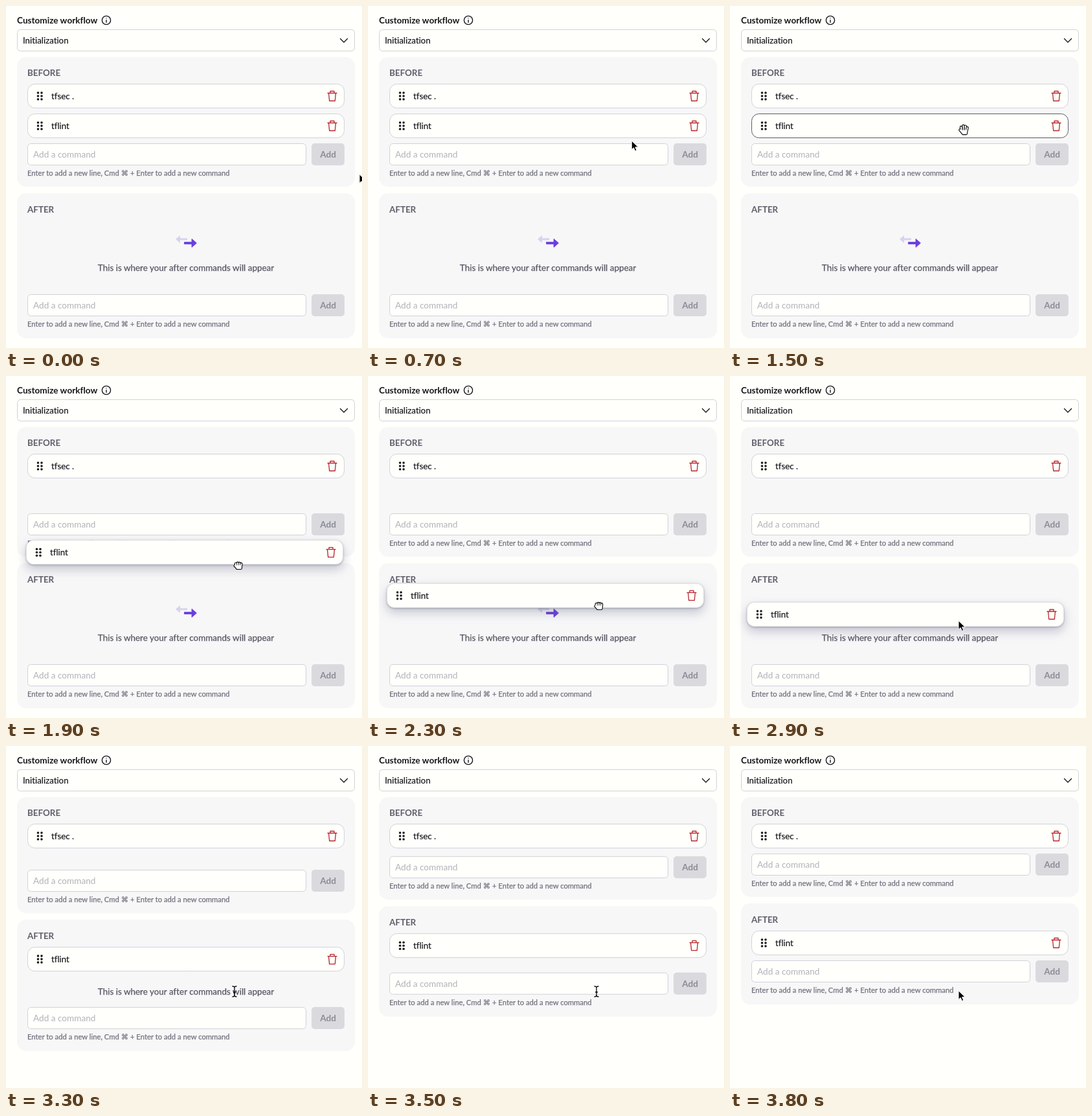
An HTML page that plays this animation: 550x528 px, repeating every 3900 ms.

```html
<!DOCTYPE html>
<html lang="en">
<head>
<meta charset="utf-8">
<title>Customize workflow</title>
<style>
  html, body { margin: 0; width: 100%; height: 100%; overflow: hidden; background: #fffffc; }
  svg { display: block; }
  text { font: 13.6px Lato, "Open Sans", sans-serif; font-variant-ligatures: none; fill: #17171c; }
  .bold { font-weight: 700; }
  .head { font-weight: 700; font-size: 13.4px; fill: #5f5f6a; }
  .item { font-size: 13.3px; stroke: #17171c; stroke-width: .2; }
  .hint { font-size: 11.28px; fill: #71717e; stroke: #71717e; stroke-width: .25; }
  .ghost { fill: #b2b2ba; }
  .note { font-size: 13.47px; fill: #565661; stroke: #565661; stroke-width: .25; text-anchor: middle; }
  .add { font-weight: 700; fill: #8b8b97; text-anchor: middle; }
  .panel { fill: #f7f7f8; }
  .box { fill: #fffffc; stroke: #d2d2d8; }
  .line { fill: none; stroke: #17171c; stroke-width: 1.4; stroke-linecap: round; stroke-linejoin: round; }
  .trash { fill: none; stroke: #b8242c; stroke-width: 1.3; stroke-linecap: round; stroke-linejoin: round; }
  .hover .box { stroke: #5c5c66; }
  .lifted { filter: drop-shadow(0 1px 1.5px rgba(60, 60, 75, .35)) drop-shadow(0 7px 8px rgba(80, 85, 115, .3)); }
  .lifted .box { stroke: #e2e2e6; }
  .cursor path { stroke-linecap: round; stroke-linejoin: round; }
</style>
</head>
<body>
<svg id="stage" width="550" height="528" viewBox="0 0 550 528"></svg>
<script>
const LOOP = 3900, STEP = 100;
const GRAB = 1500, RELEASE = 2700, DROP = 2900, SETTLED = 3100;

const text = (x, y, cls, s) => `<text x="${x}" y="${y}" class="${cls}">${s}</text>`;
const rect = (x, y, w, h, r, cls, id = '') =>
  `<rect id="${id}" x="${x}" y="${y}" width="${w}" height="${h}" rx="${r}" class="${cls}"/>`;

const dots = [14, 19, 24].map(y =>
  [16.5, 22].map(x => `<circle cx="${x}" cy="${y}" r="1.8" fill="#17171c"/>`).join('')).join('');

const card = (id, label, x, y) => `<g id="${id}" transform="translate(${x} ${y})">
  ${rect(.5, .5, 489, 37, 11, 'box')}${dots}${text(37, 24, 'item', label)}
  <path class="trash" d="M464 14.5H478M468 14V11.5H474V14M465.5 14.5L466.7 26.5H475.3L476.5 14.5"/>
</g>`;

const form = (id, y) => `<g id="${id}"><g transform="translate(33 ${y})">
  ${rect(.5, .5, 430, 33, 5, 'box')}${text(9, 22, 'ghost', 'Add a command')}
  <rect x="439" width="51" height="34" rx="5" fill="#dadade"/>${text(464.5, 22, 'add', 'Add')}
  ${text(0, 50, 'hint', 'Enter to add a new line, Cmd ⌘ + Enter to add a new command')}
</g></g>`;

// A hand is stroked twice: a thick black outline, then a thinner white body.
const hand = (id, d, creases) => `<g id="${id}">
  <path d="${d}" fill="#000" stroke="#000" stroke-width="4.4"/>
  <path d="${d}" fill="#fff" stroke="#fff" stroke-width="2.2"/>
  <path d="${creases}" stroke="#000" stroke-width=".8"/></g>`;

const cursors = `<g id="pointer" class="cursor">
  <path id="arrow" d="M0 0V13.5L3.2 10.6L5.4 15.6L7.8 14.6L5.6 9.7H10Z" fill="#000" stroke="#fff"/>
  <path id="beam" d="M-3 -7Q0 -7 0 -5V7Q0 9 -3 9M3 -7Q0 -7 0 -5M0 7Q0 9 3 9M-1.5 2H1.5"
    fill="none" stroke="#000" stroke-width="1.3"/>
  ${hand('open', 'M-3 2L-4 -4M-.5 1V-6M2.3 1L2.8 -5.4M4.6 1L5.6 -3M-2.5 4L-5.6 .4M-3 2L4.6 1L3.8 6H-1Z',
    'M-1.8 -3V0M1.2 -3.6V0M4 -2.6L3.7 0')}
  ${hand('grab', 'M-3.6 -1V-2.6M-.8 -1V-3.4M2 -1V-3.2M4.6 -1V-2.2M-5 1L-3.6 0M-3.6 -1L4.6 -1L4 4.6H-1.6L-4.4 1Z',
    'M-2.2 -3V-.4M.6 -3.4V-.4M3.3 -3V-.4')}
</g>`;

stage.innerHTML = `
  ${text(17, 27, 'bold', 'Customize workflow')}
  <circle cx="155" cy="22" r="6.6" class="line"/>
  <path class="line" d="M155 21.6V25.2M155 18.7V18.8"/>
  ${rect(17.5, 36.5, 521, 33, 5, 'box')}
  ${text(26, 58, 'item', 'Initialization')}
  <path class="line" d="M516.5 50.5L522 56L527.5 50.5"/>
  ${rect(17, 79, 522, 200, 14, 'panel', 'panel1')}
  ${text(33, 108, 'head', 'BEFORE')}
  ${card('first', 'tfsec .', 33, 120)}
  ${form('form1', 212)}
  <g id="after">
    ${rect(17, 289, 522, 224, 14, 'panel', 'panel2')}
    ${text(33, 319, 'head', 'AFTER')}
    <g id="empty">
      <path d="M262 360L269 354V358.5H280V361.5H269V366Z" fill="#d8d2ee"/>
      <path d="M294.5 366L287 359.5V364.5H275.5V367.5H287V372.5Z" fill="#6b3fdc"
        stroke="#6b3fdc" stroke-width=".8" stroke-linejoin="round"/>
      ${text(278, 409, 'note', 'This is where your after commands will appear')}
    </g>
    ${form('form2', 445)}
  </g>
  ${card('moving', 'tflint', 33, 166)}
  ${cursors}`;

const $ = id => document.getElementById(id);
const move = (id, x, y) => $(id).setAttribute('transform', `translate(${x} ${y})`);
const ramp = (t, from, to) => Math.min(1, Math.max(0, (t - from) / (to - from)));
const easeOut = p => p * (2 - p);
const mix = (a, b, p) => a + (b - a) * p;

function pointerAt(t) {
  const arrive = easeOut(ramp(t, 0, 1400));
  const drag = easeOut(ramp(t, GRAB, 2740));
  return [
    mix(546, 361, arrive) - 8 * ramp(t, GRAB, DROP),
    mix(260, 191, arrive) + 187 * drag
  ];
}

// The card trails the hand, then slides into its slot.
function cardAt(t) {
  const settle = ramp(t, DROP, SETTLED);
  const drag = easeOut(ramp(t, 1560, 2790));
  return [
    mix(mix(33, 26, ramp(t, GRAB, DROP)), 33, settle),
    mix(mix(166, 349, drag), 331, settle)
  ];
}

function draw(t) {
  const up = -46 * ramp(t, SETTLED, 3540);
  const low = -68 * ramp(t, 3170, 3590);
  const noteShift = low * .19;
  $('panel1').setAttribute('height', 200 + up);
  $('panel2').setAttribute('height', 224 + low);
  move('form1', 0, up);
  move('after', 0, up);
  move('form2', 0, low);
  move('empty', 0, noteShift);
  $('empty').setAttribute('opacity', 1 - ramp(t, 3300, 3500));

  const [cx, cy] = cardAt(t);
  move('moving', cx, cy + up);

  const [px, py] = pointerAt(t);
  const overInput = top => px < 464 && py > top && py < top + 34;
  const overText = overInput(212 + up) || overInput(445 + up + low)
    || Math.abs(404 + up + noteShift - py) < 8;
  const dragging = t > GRAB && t < RELEASE;
  const hovering = t <= GRAB && py < 204;
  const shape = dragging ? 'grab' : hovering ? 'open' : overText ? 'beam' : 'arrow';
  move('pointer', px, py);
  for (const id of ['arrow', 'beam', 'open', 'grab'])
    $(id).style.display = id === shape ? '' : 'none';
  $('moving').setAttribute('class', t > GRAB && t < SETTLED ? 'lifted' : hovering ? 'hover' : '');
}

function tick() {
  draw(Math.floor(performance.now() % LOOP / STEP) * STEP);
  requestAnimationFrame(tick);
}
tick();
</script>
</body>
</html>
```
